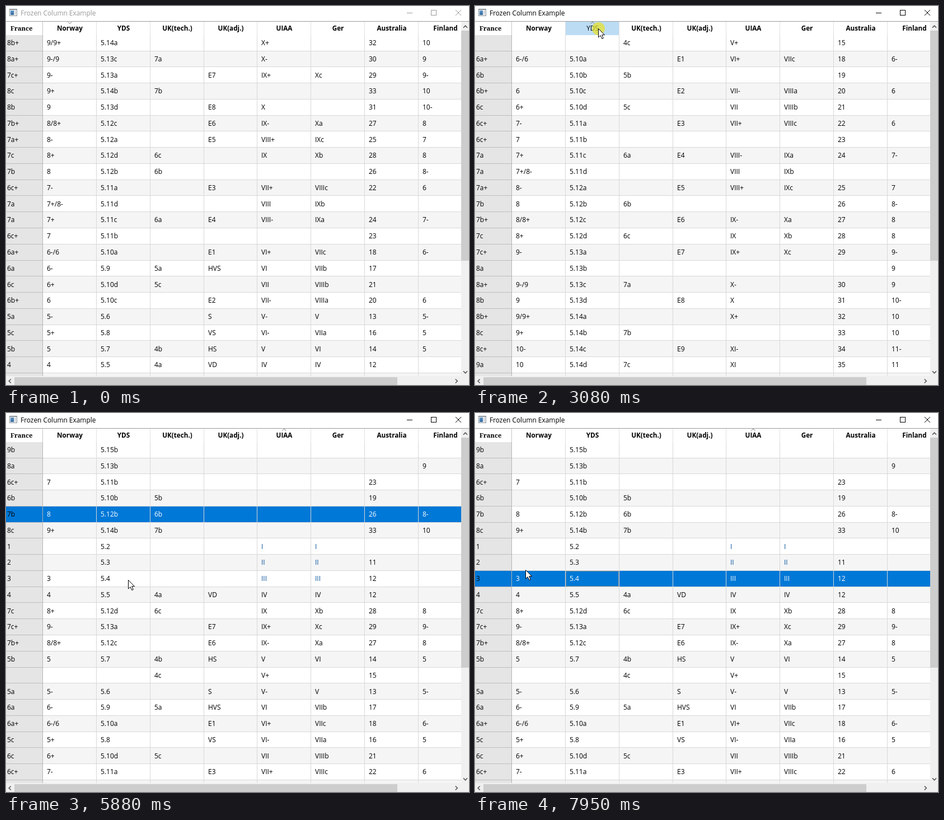
These frames come from a looping animation (827x677 px, 8000 ms). An HTML page with a canvas:

```html
<!DOCTYPE html>
<html lang="en">
<head>
<meta charset="utf-8">
<title>Frozen Column Example</title>
<style>
html, body { margin: 0; width: 100%; height: 100%; overflow: hidden; background: #fff; }
canvas { display: block; }
</style>
</head>
<body>
<canvas id="stage" width="827" height="677"></canvas>
<script>
const ctx = document.getElementById('stage').getContext('2d');
const LOOP = 8000, RIGHT = 813, BOTTOM = 661, HEAD_TOP = 28, HEAD_END = 52;
const ROW = 28.77, COL = 95.86;
const SANS = '"Open Sans", "Noto Sans", sans-serif';
const heads = ['France', 'Norway', 'YDS', 'UK(tech.)', 'UK(adj.)', 'UIAA', 'Ger', 'Australia', 'Finland'];

// Climbing grades from easy to hard; each scale is a function of the step i.
const STEPS = 31, GAP = 6;
const roman = ',I,II,III,IV,V,VI,VII,VIII,IX,X,XI'.split(',');
const listed = str => {
  const words = str.split(' ').map(w => w === '.' ? '' : w);
  return i => words[i] || '';
};

function france(i) {
  if (i < 4) return String(i + 1);
  if (i < 8) return ['5a', '5b', '', '5c'][i - 4];
  const k = i - 8 - (i > 13) - (i > 15), half = k % 6;
  return 6 + Math.floor(k / 6) + 'abc'[half >> 1] + (half % 2 ? '+' : '');
}

function yds(i) {
  if (i === GAP) return '';
  if (i < 9) return '5.' + (i + 2 - (i > GAP));
  return '5.' + (10 + Math.floor((i - 9) / 4)) + 'abcd'[(i - 9) % 4];
}

function uiaa(i) {
  if (i < 4) return roman[i + 1];
  if (i < 10) return roman[5 + Math.floor((i - 4) / 3)] + ['-', '', '+'][(i - 4) % 3];
  const part = (i - 10) % 4;
  return part && i < 30 ? roman[7 + Math.floor((i - 10) / 4)] + ['-', '', '+'][part - 1] : '';
}

function german(i) {
  if (i < GAP) return roman[i + 1];
  const part = (i - GAP) % 4;
  return part && i < 22 ? roman[7 + Math.floor((i - GAP) / 4)] + 'abc'[part - 1] : '';
}

function australia(i) {
  if (i < 1 || i === 16 || i === 22 || i > 28) return '';
  return String(i + 10 - (i > 2) - (i > 16) - (i > 22));
}

const scales = [
  france,
  listed('. . 3 4 5- 5 . 5+ 6- 6-/6 . 6 6+ 7- 7 7+ 7+/8- 8- 8 8/8+ 8+ 9- . 9-/9 9 9/9+ 9+ 10- 10'),
  yds,
  listed('. . . 4a . 4b 4c . 5a . 5b . 5c . . 6a . . 6b . 6c . . 7a . . 7b . 7c'),
  listed('. . . VD S HS . VS HVS E1 . E2 . E3 . E4 . E5 . E6 . E7 . . E8 . . E9'),
  uiaa, german, australia,
  listed('. . . . 5- 5 . 5 . 6- . 6 . 6 . 7- . 7 8- 8 8 9- 9 9 10- 10 10 11- 11')
];
const grades = Array.from({ length: STEPS }, (_, i) => scales.map(scale => scale(i)));

// Pointer stops: leave time, press time, hold (0 = no click), place.
const stops = [
  [160, 950, 0, 117, 76], [950, 1530, 120, 46, 36], [1650, 1880, 80, 122, 41],
  [2100, 2370, 80, 215, 42], [2850, 3050, 130, 220, 40], [3200, 3470, 90, 304, 42],
  [3660, 3980, 110, 386, 50], [4130, 4470, 90, 486, 43], [4620, 5200, 160, 46, 186],
  [5610, 5910, 100, 218, 298], [6160, 6560, 100, 655, 184], [6700, 7010, 130, 706, 118],
  [7390, 7660, 100, 204, 286], [7890, 7950, 0, 90, 280]
].map(([go, press, hold, x, y]) => ({ go, press, hold, x, y }));

const colLine = c => Math.floor(65.5 + COL * c);
const rowLine = r => Math.floor(80 + ROW * r);
const colAt = x => heads.findIndex((_, c) => x <= colLine(c));
const inHeader = y => y >= HEAD_TOP && y < HEAD_END;

function sortBy(rows, col, dir) {
  return [...rows].sort((a, b) => dir * (a[col] < b[col] ? -1 : a[col] > b[col] ? 1 : 0));
}

// Replay the clicks: a header sorts on release, a cell selects on press.
let view = { t: 0, col: 1, dir: -1, rows: sortBy(grades, 1, -1), picked: grades[1], focus: 0 };
const views = [view];
for (const { press, hold, x, y } of stops.filter(s => s.hold)) {
  const col = colAt(x);
  if (!inHeader(y)) {
    const picked = view.rows[Math.floor((y - HEAD_END) / ROW)];
    view = { ...view, t: press, picked, focus: col };
  } else if (col) {
    const dir = col === view.col ? -view.dir : 1;
    view = { ...view, t: press + hold, col, dir, rows: sortBy(view.rows, col, dir) };
  }
  views.push(view);
}

function pointer(t) {
  if (t < stops[0].go) return null;
  let x = 772, y = 674;
  for (const s of stops) {
    if (t < s.go) break;
    const time = Math.min(s.press - s.go, 100 + 0.78 * Math.hypot(s.x - x, s.y - y));
    const u = Math.min(1, (t - s.go) / time), e = u * u * (3 - 2 * u);
    x += (s.x - x) * e;
    y += (s.y - y) * e;
  }
  return [Math.round(x), Math.round(y)];
}

function box(x, y, w, h, color) {
  ctx.fillStyle = color;
  ctx.fillRect(x, y, w, h);
}

function text(str, x, y, color, font, align = 'left') {
  ctx.font = font;
  ctx.textAlign = align;
  ctx.fillStyle = color;
  ctx.fillText(str, x, y);
}

function stroke(points, color, width = 1) {
  ctx.beginPath();
  points.forEach(([x, y]) => ctx.lineTo(x, y));
  ctx.strokeStyle = color;
  ctx.lineWidth = width;
  ctx.stroke();
}

function chevron(x, y, dx, dy, color, width) {
  const points = dx ? [[x - dx, y - 3.5], [x + dx, y], [x - dx, y + 3.5]]
                    : [[x - 3.5, y - dy], [x, y + dy], [x + 3.5, y - dy]];
  stroke(points, color, width);
}

function titleBar(active) {
  const ink = active ? '#000' : '#999';
  box(0, 0, 827, 27, '#fff');
  box(6, 5, 14, 13, '#8b9299');
  box(7, 7, 12, 10, '#f4f6f8');
  const pane = ctx.createLinearGradient(8, 8, 13, 16);
  pane.addColorStop(0, '#6fa5d4');
  pane.addColorStop(1, '#285f93');
  box(8, 8, 6, 8, pane);
  box(15, 8, 3, 8, '#d3d8dc');
  text('Frozen Column Example', 26, 16.5, ink, '11.9px ' + SANS);
  box(716, 12, 10, 1, ink);
  ctx.strokeStyle = ink;
  ctx.lineWidth = 1;
  ctx.strokeRect(759.5, 7.5, 9, 9);
  stroke([[803, 7], [813, 17]], ink);
  stroke([[813, 7], [803, 17]], ink);
  box(0, 27, 827, 1, '#9b9b9b');
}

function tableRow(row, r, { picked, focus }) {
  const top = r ? rowLine(r - 1) + 1 : HEAD_END, line = rowLine(r);
  const chosen = row === picked;
  box(0, top, RIGHT, line - top, chosen ? '#0078d7' : r % 2 ? '#f5f5f5' : '#fff');
  if (!chosen) box(0, top, 65, line - top, '#e5e5e5');
  box(66, line, RIGHT - 66, 1, '#d8d8d8');
  box(0, line, 66, 1, '#bdbdbd');
  row.forEach((val, c) => {
    box(colLine(c), top, 1, line - top + 1, c ? '#d8d8d8' : '#b4b4b4');
    const plain = /^I+$/.test(val) ? '#0b559f' : '#000';
    const x = c ? colLine(c - 1) + 8 : 2;
    text(val, x, Math.round(70 + ROW * r), c && chosen ? '#fff' : plain, '12px ' + SANS);
  });
  if (chosen && focus) {
    const x = colLine(focus - 1) + 1.5, w = colLine(focus) - x - 0.5;
    ctx.strokeStyle = '#ef9a52';
    ctx.lineWidth = 1;
    ctx.setLineDash([1, 1]);
    ctx.strokeRect(x, top + 0.5, w, line - top - 1);
    ctx.setLineDash([]);
  }
}

function header({ col, dir }, at, down) {
  box(0, HEAD_TOP, RIGHT, HEAD_END - HEAD_TOP, '#fff');
  const hot = at && inHeader(at[1]) ? colAt(at[0]) : -1;
  heads.forEach((name, c) => {
    const x = c ? colLine(c - 1) + 1 : 0, end = colLine(c), mid = (x + end) / 2 + 0.5;
    const held = c === hot && down;
    if (c === hot) box(x, HEAD_TOP, end - x, HEAD_END - HEAD_TOP, held ? '#bcdcf4' : '#d9ebf9');
    box(end, HEAD_TOP, 1, HEAD_END - HEAD_TOP, c ? '#e2e2e2' : '#c4c4c4');
    if (c === col) chevron(mid, 30, 0, -1.7 * dir, '#777', 1);
    const weight = held ? '' : 'bold ';
    if (c) text(name, mid, 44, '#000', weight + '11.7px ' + SANS, 'center');
    else text(name, 8, 44, '#000', weight + '11.3px "Noto Serif", serif');
  });
}

function scrollBars() {
  box(RIGHT, HEAD_TOP, 14, 649, '#f0f0f0');
  box(0, BOTTOM, 827, 16, '#f0f0f0');
  box(RIGHT, 44, 14, 411, '#cdcdcd');
  box(15, 663, 684, 14, '#cdcdcd');
  chevron(820.5, 37, 0, -1.8, '#555', 1.6);
  chevron(820.5, 654, 0, 1.8, '#555', 1.6);
  chevron(7, 670, -1.8, 0, '#555', 1.6);
  chevron(804.5, 670, 1.8, 0, '#555', 1.6);
}

function arrow([x, y], halo) {
  ctx.save();
  ctx.translate(x + 0.5, y + 0.5);
  if (halo) {
    ctx.beginPath();
    ctx.arc(0, 0, 11.5, 0, 7);
    ctx.fillStyle = 'rgba(232, 226, 40, 0.72)';
    ctx.fill();
  }
  const shape = new Path2D('M0 0V15.5L3.6 12.2L6.3 18L8.8 17L6.2 11.2H11Z');
  ctx.fillStyle = '#fff';
  ctx.fill(shape);
  ctx.strokeStyle = '#000';
  ctx.lineWidth = 1;
  ctx.stroke(shape);
  ctx.restore();
}

function draw(t) {
  const now = views.filter(v => v.t <= t).pop();
  const at = pointer(t);
  const click = stops.find(s => t >= s.press && t < s.press + s.hold);
  box(0, 0, 827, 677, '#fff');
  ctx.save();
  ctx.beginPath();
  ctx.rect(0, HEAD_TOP, RIGHT, BOTTOM - HEAD_TOP);
  ctx.clip();
  now.rows.slice(0, 22).forEach((row, r) => tableRow(row, r, now));
  header(now, at, click);
  ctx.restore();
  scrollBars();
  titleBar(t >= stops[1].press);
  // The halo shows up a moment after the press.
  if (at) arrow(at, click && t >= click.press + 30);
}

const start = performance.now();
function tick() {
  draw((performance.now() - start) % LOOP);
  requestAnimationFrame(tick);
}
tick();
</script>
</body>
</html>
```
